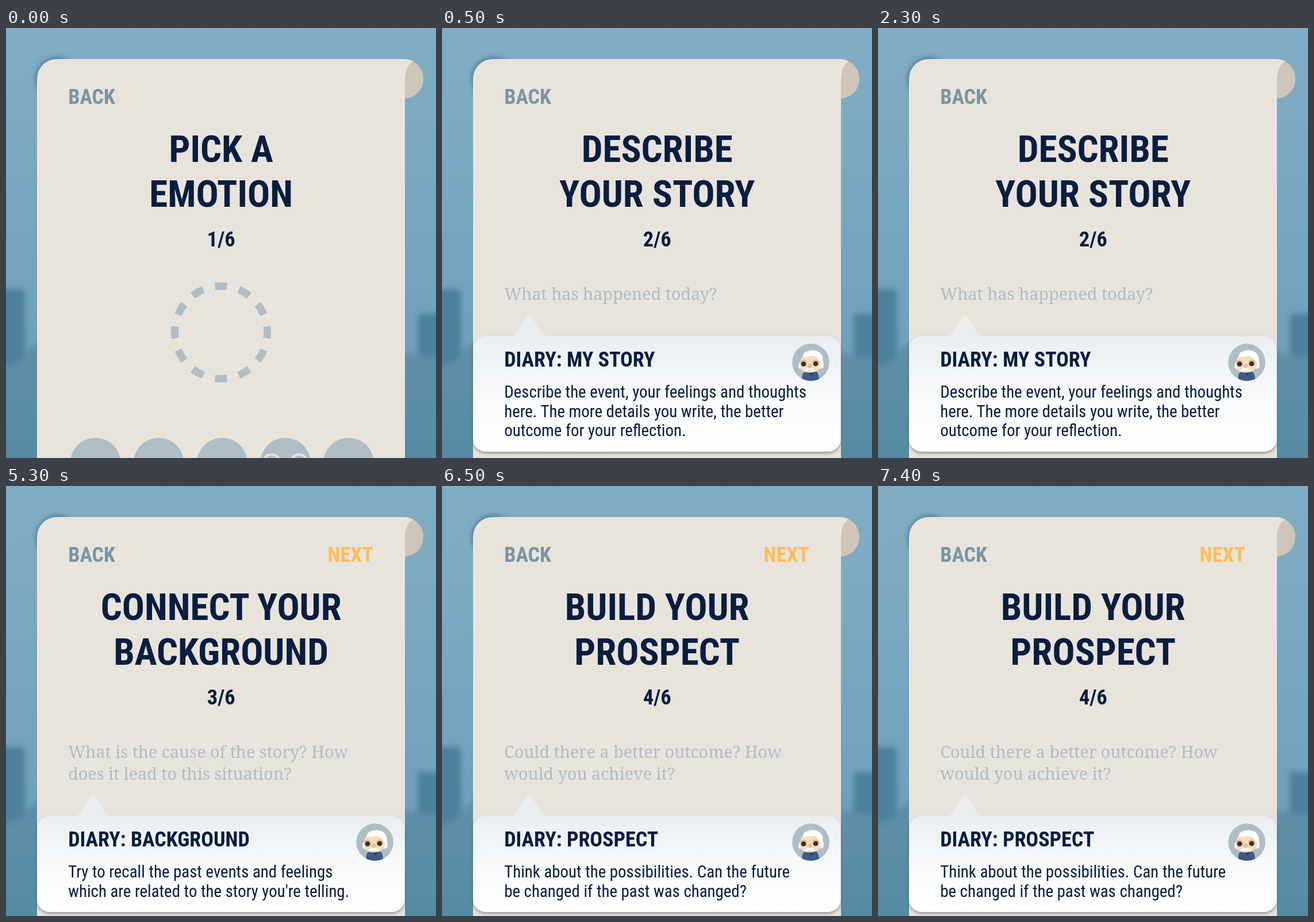
Recreate the animation shown at these times as an HTML page. Size 748 px wide and 748 px high, loop 8 s.

```html
<!DOCTYPE html>
<html lang="en">
<head>
<meta charset="utf-8">
<title>Diary steps</title>
<style>
  html, body { margin: 0; width: 100%; height: 100%; overflow: hidden; background: #7aa6bf; }
  svg { display: block; width: 100vw; height: 100vh; }
  text { font-family: "Roboto Condensed", Roboto, sans-serif; font-stretch: condensed; fill: #081d40; }
  .bold { font-weight: 700; }
  .body { font-size: 28.9px; }
  .prompt { font-family: "Roboto Slab", "Noto Serif", serif; font-size: 28.7px; fill: #afbdc5; }
</style>
</head>
<body>
<svg viewBox="0 0 748 748">
  <defs>
    <linearGradient id="sky" x2="0" y2="1">
      <stop stop-color="#82adc4"/><stop offset=".7" stop-color="#70a1bc"/><stop offset="1" stop-color="#6c9db8"/>
    </linearGradient>
    <linearGradient id="ground" x2="0" y2="1">
      <stop stop-color="#5f90a8"/><stop offset="1" stop-color="#558aa3"/>
    </linearGradient>
    <linearGradient id="paper" x2="0" y2="1">
      <stop stop-color="#eaeef2"/><stop offset=".6" stop-color="#fafbfc"/><stop offset="1" stop-color="#fff"/>
    </linearGradient>
    <filter id="blur" x="-50%" y="-50%" width="200%" height="200%"><feGaussianBlur stdDeviation="5"/></filter>
    <filter id="shadow" x="-10%" y="-10%" width="120%" height="125%">
      <feDropShadow dx="0" dy="3" stdDeviation="2.5" flood-color="#43505c" flood-opacity=".5"/>
    </filter>
    <clipPath id="face"><circle r="32.5"/></clipPath>
    <g id="avatar" clip-path="url(#face)">
      <circle r="32.5" fill="#afbdc5"/>
      <path d="M-15 33V24Q-14 16-6 15H8Q14 17 15 33Z" fill="#405a86"/>
      <path d="M-6 15L1 24L8 15Z" fill="#2c4369"/>
      <path d="M-16-5Q-23 3-21 10Q-18 13-14 10ZM14-10Q25-2 22 9Q18 13 13 10Z" fill="#f5f6f7"/>
      <path d="M-18-2Q-17-13-4-14H10Q16-11 17 0Q18 11 10 16Q-2 20-13 16Q-20 11-18-2Z" fill="#f7dfbc"/>
      <path d="M-14-10Q-13-18-6-19Q5-24 14-18Q22-13 21-2Q16 2 15-3Q11-10 5-11Q-5-9-14-10Z" fill="#fff"/>
      <circle cx="-12.5" cy="1.5" r="6" fill="#e4b98e"/><circle cx="8.5" cy="1" r="6" fill="#e4b98e"/>
      <circle cx="-12.5" cy="3" r="4.3" fill="#30343b"/><circle cx="8.5" cy="2.5" r="4.3" fill="#30343b"/>
      <ellipse cx="-2" cy="6" rx="4.5" ry="3.5" fill="#eebd8e"/>
      <path d="M-11 15Q-8 9-2 10.500Q5 9 8 15Q2 16-2 13.500Q-6 16-11 15Z" fill="#fff"/>
    </g>
  </defs>

  <rect width="748" height="748" fill="url(#sky)"/>
  <g filter="url(#blur)">
    <path d="M-20 582L35 565L60 542L690 564L768 572V768H-20Z" fill="url(#ground)"/>
    <path d="M-20 454H25Q33 454 33 464V572L10 586L-20 592Z" fill="#4d809c"/>
    <path d="M768 497H722Q716 497 716 505V570H768Z" fill="#4d809c"/>
    <circle cx="89" cy="88" r="36.500" fill="#3f7398"/>
  </g>
  <circle cx="691.700" cy="88.500" r="34.500" fill="#cfc5b8"/>
  <path d="M54 748V88A34 34 0 0 1 88 54H691.700A34.500 34.500 0 0 1 708 58Q694 66 694 92V748Z" fill="#e8e4dc"/>
  <g id="screen"></g>
</svg>
<script>
const steps = [
  { until: 500, title: ['PICK A', 'EMOTION'] },
  { until: 3500, title: ['DESCRIBE', 'YOUR STORY'], prompt: ['What has happened today?'],
    top: 536, bottom: 737, topic: 'MY STORY',
    hint: ['Describe the event, your feelings and thoughts', 'here. The more details you write, the better', 'outcome for your reflection.'] },
  { until: 6500, title: ['CONNECT YOUR', 'BACKGROUND'], next: true,
    prompt: ['What is the cause of the story? How', 'does it lead to this situation?'],
    top: 574, bottom: 741, topic: 'BACKGROUND',
    hint: ['Try to recall the past events and feelings', "which are related to the story you're telling."] },
  { until: 8000, title: ['BUILD YOUR', 'PROSPECT'], next: true,
    prompt: ['Could there a better outcome? How', 'would you achieve it?'],
    top: 574, bottom: 741, topic: 'PROSPECT',
    hint: ['Think about the possibilities. Can the future', 'be changed if the past was changed?'] }
];

const label = (str, x, y, size, extra = '') =>
  `<text class="bold" x="${x}" y="${y}" font-size="${size}" ${extra}>${str}</text>`;
const centered = (str, y, size) => label(str, 374.2, y, size, 'text-anchor="middle"');
const lines = (rows, kind, y, gap) =>
  rows.map((row, i) => `<text class="${kind}" x="108.2" y="${y + i * gap}">${row}</text>`).join('');

function picker() {
  const dots = [155.5, 265.5, 376, 486, 596].map(x => `<circle cx="${x}" cy="757" r="44"/>`).join('');
  const brows = [462, 510].map(x => `<path d="M${x - 13} 750Q${x - 9} 742 ${x} 742T${x + 13} 750"/>`).join('');
  return `<circle cx="374" cy="529.5" r="80.5" fill="none" stroke="#afbdc5" stroke-width="13"
    pathLength="24" stroke-dasharray="1" stroke-dashoffset=".5"/>
    <g fill="#afbdc5">${dots}</g><g fill="none" stroke="#e8e4dc" stroke-width="4">${brows}</g>`;
}

function panel({ top, bottom, topic, hint }) {
  return `<g filter="url(#shadow)">
      <rect x="54" y="${top}" width="639.5" height="${bottom - top}" rx="22" fill="url(#paper)"/></g>
    <path transform="translate(151.5 ${top})" d="M-33 1Q-25 0-21-7L-6-31Q0-40 6-31L21-7Q25 0 33 1Z" fill="#eaeef1"/>
    <use href="#avatar" x="641.5" y="${top + 45.5}"/>
    ${label('DIARY: ' + topic, 108.2, top + 53, 36)}${lines(hint, 'body', top + 107, 33.6)}`;
}

function render(step, i) {
  return label('BACK', 108.2, 131.7, 36, 'style="fill:#7a95a2"')
    + (step.next ? label('NEXT', 559.5, 131.7, 36, 'style="fill:#ffbc5b"') : '')
    + centered(step.title[0], 232.5, 65) + centered(step.title[1], 310.5, 65)
    + centered(`${i + 1}/6`, 380, 36.5)
    + (step.prompt ? lines(step.prompt, 'prompt', 473, 38) + panel(step) : picker());
}

const screen = document.getElementById('screen');
let shown = -1;
function tick() {
  const time = performance.now() % 8000;
  const i = steps.findIndex(step => time < step.until);
  if (i !== shown) {
    screen.innerHTML = render(steps[i], i);
    shown = i;
  }
  requestAnimationFrame(tick);
}
tick();
</script>
</body>
</html>
```
